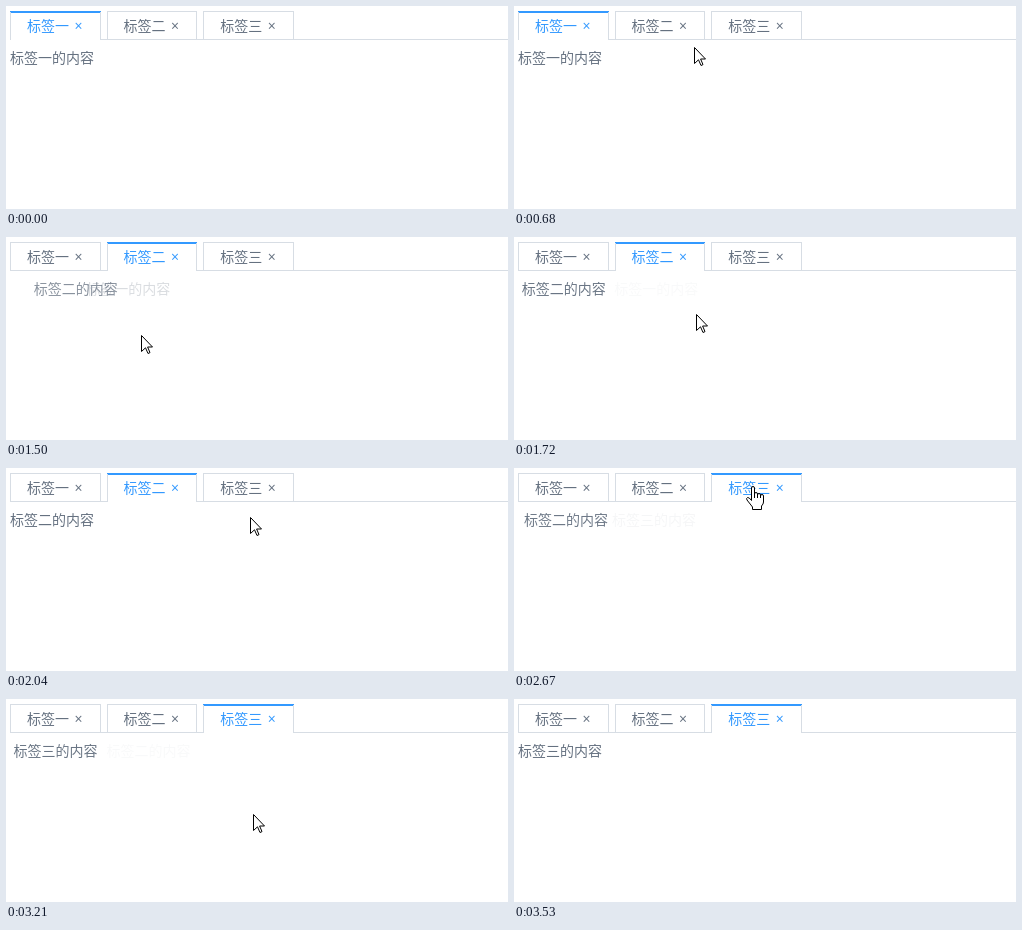
An HTML page for the animation above (4390 ms loop, 502 by 203 pixels).

```html
<!DOCTYPE html>
<html lang="zh-CN">
<head>
<meta charset="utf-8">
<title>标签页</title>
<style>
html, body { margin: 0; width: 100%; height: 100%; overflow: hidden; background: #fff; }
svg { display: block; width: 502px; height: 203px; font: 14px "Noto Sans CJK SC", "Noto Sans CJK", sans-serif; }
text { fill: #657180; }
.close { font-family: "Open Sans", sans-serif; text-anchor: middle; }
.box { fill: #d7dde4; }
.inner { fill: #fff; }
.bar, .base { fill: none; }
.on .bar, .on text { fill: #39f; }
.on .base { fill: #fff; }
#arrow, #hand { fill: #fff; stroke: #000; }
</style>
</head>
<body>
<svg viewBox="0 0 502 203">
  <rect class="box" x="4" y="33" width="498" height="1"/>
  <g id="tabs"></g>
  <g id="pages"></g>
  <g id="mouse">
    <g id="click" fill="none">
      <circle r="11" stroke="#000"/>
      <circle r="10" stroke="#fff"/>
    </g>
    <path id="arrow" d="M.5 .5V16.5L4.5 12.8L7 18.5L9 17.6L6.6 12H11.5Z"/>
    <path id="hand" d="M-.5 14V2Q-.5 .5 1 .5T2.5 2V8Q2.5 6.5 4 6.5T5.5 8V9Q5.5 7.5 7 7.5T8.5 9V10Q8.5 8.5 10 8.5T11.5 10V16Q11.5 18 9.5 20V23.5H.5V21L-5 14Q-6 12-4.5 11.5T-.5 14.5ZM2.5 8V12M5.5 9V12M8.5 10V12"/>
  </g>
</svg>
<script>
const LOOP = 4390, SLIDE = 800, STEP = 79, PHASE = 364;
const CLICKS = [1100, 2595]; // mouse released, next tab opens
const $ = id => document.getElementById(id);
const show = (el, on) => el.setAttribute('visibility', on ? 'inherit' : 'hidden');

const names = ['一', '二', '三'];
$('tabs').innerHTML = names.map((name, i) => {
  const left = 4 + 96.6 * i, x = Math.round(left), w = Math.round(left + 90.6) - x;
  return `<g>
    <rect class="box" x="${x}" y="5" width="${w}" height="29"/>
    <rect class="inner" x="${x + 1}" y="6" width="${w - 2}" height="27"/>
    <rect class="base" x="${x + 1}" y="33" width="${w - 2}" height="1"/>
    <path class="bar" d="M${x} 5h${w}v1h-1v1h${2 - w}v-1h-1z"/>
    <text x="${left + 17}" y="25">标签${name}</text>
    <text class="close" x="${left + 68.5}" y="25">×</text></g>`;
}).join('');
$('pages').innerHTML = names.map(name => `<text y="57">标签${name}的内容</text>`).join('');

// Pointer key points: time, x, y
const path = [[364, 362, 190], [680, 180, 41], [838, 126, 18], [1154, 126, 18], [1470, 135, 98],
  [2023, 244, 49], [2339, 238, 18], [2800, 238, 18], [3208, 247, 115], [3524, 452, 215]];

// CSS "ease": cubic-bezier(.25, .1, .25, 1)
function ease(t) {
  const bez = (s, a, b) => 3 * s * (1 - s) * ((1 - s) * a + s * b) + s ** 3;
  let lo = 0, hi = 1;
  for (let i = 0; i < 20; i++) {
    const mid = (lo + hi) / 2;
    if (bez(mid, .25, .25) < t) lo = mid; else hi = mid;
  }
  return bez(lo, .1, 1);
}

function drawTabs(t) {
  const active = CLICKS.filter(c => c <= t).length;
  const p = active ? ease(Math.min(1, (t - CLICKS[active - 1]) / SLIDE)) : 1;
  [...$('tabs').children].forEach((tab, i) => tab.classList.toggle('on', i === active));
  [...$('pages').children].forEach((page, i) => {
    const shown = i === active ? p : i === active - 1 ? 1 - p : 0;
    page.setAttribute('x', 104 - 100 * shown);
    page.setAttribute('opacity', shown);
  });
}

function drawMouse(t) {
  const next = path.findIndex(p => p[0] > t);
  show($('mouse'), next > 0);
  if (next < 1) return;
  const a = path[next - 1], b = path[next];
  const k = (t - a[0]) / (b[0] - a[0]);
  const [x, y] = [1, 2].map(j => Math.round(a[j] + (b[j] - a[j]) * k));
  $('mouse').setAttribute('transform', `translate(${x} ${y})`);
  show($('hand'), y < 34);
  show($('arrow'), y >= 34);
  show($('click'), CLICKS.some(c => t >= c - 100 && t < c));
}

function frame() {
  const now = performance.now() % LOOP;
  const t = PHASE + STEP * Math.floor((now - PHASE) / STEP); // the picture moves in steps
  drawTabs(t);
  drawMouse(t);
  requestAnimationFrame(frame);
}
frame();
</script>
</body>
</html>
```
